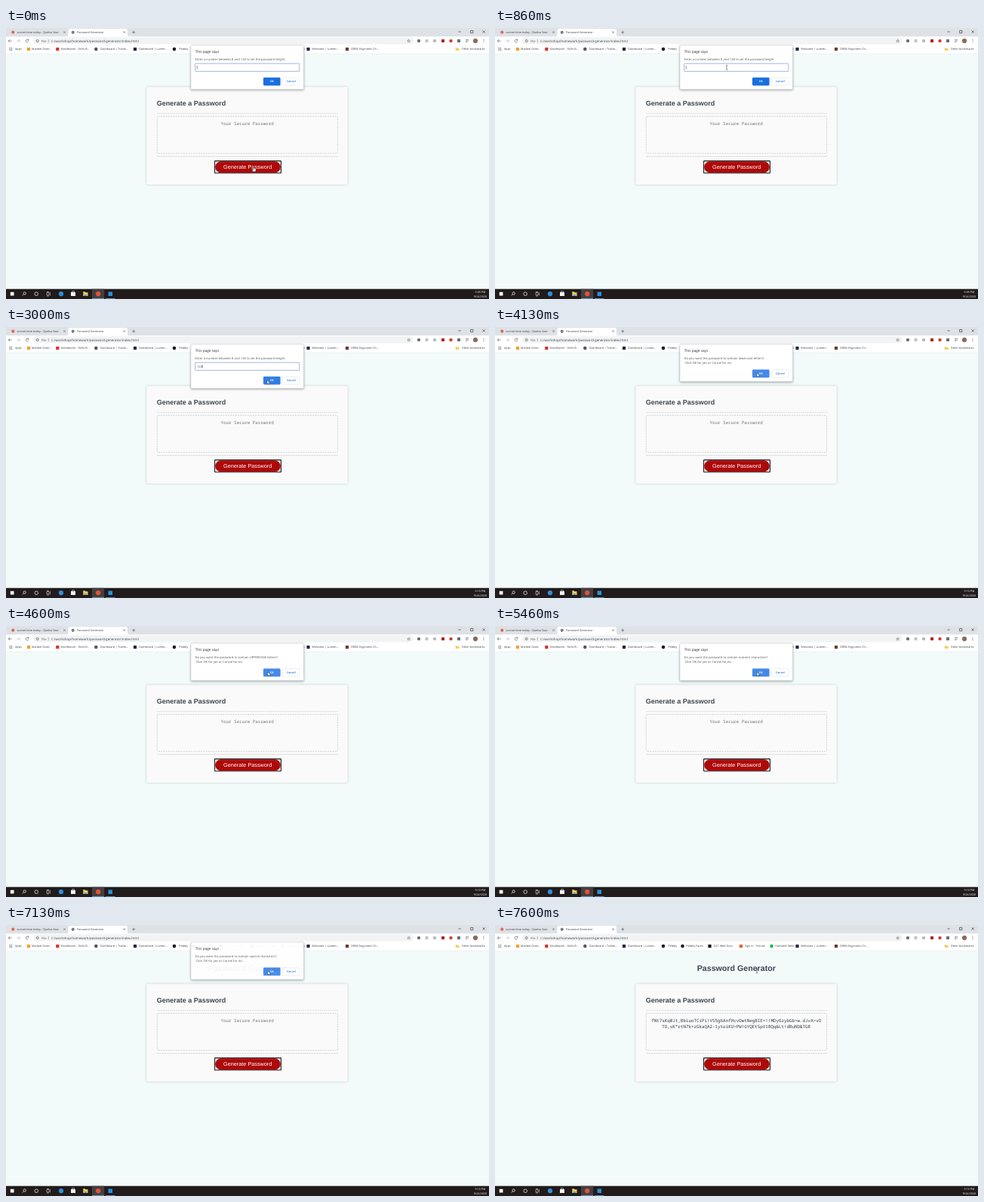
Animation of 640 by 360 pixels, one loop 8 s. Source, as an HTML page:

```html
<!DOCTYPE html>
<html lang="en">
<head>
<meta charset="utf-8">
<title>Password Generator</title>
<style>
html, body { margin: 0; width: 100%; height: 100%; overflow: hidden; background: #f2fafa; }
svg { display: block; width: 640px; height: 360px; }
text { font-family: "Open Sans", "Noto Sans", sans-serif; font-size: 3.76px; fill: #3c4043; text-rendering: geometricPrecision; white-space: pre; }
.page { font-family: "Liberation Sans", Arial, sans-serif; font-weight: bold; fill: #3b4650; }
.mono { font-family: "Noto Sans Mono", "DejaVu Sans Mono", monospace; font-size: 5.86px; text-anchor: middle; }
.says { font-size: 4.7px; fill: #202124; }
.msg { font-size: 4.1px; fill: #505357; }
.btn { font-size: 3.7px; font-weight: 600; text-anchor: middle; }
.clock { font-size: 3.7px; fill: #fff; text-anchor: middle; }
.url { font-size: 4.4px; }
.panel { filter: drop-shadow(0 1px 1.6px rgba(0, 0, 0, .35)); }
.card { filter: drop-shadow(.3px .3px 1.4px rgba(0, 0, 0, .2)); }

/* One shared 8 s timeline: 1% = 80 ms */
.dialog { animation: 8s infinite linear; }
#prompt { animation-name: prompt; }
#lower { animation-name: lower; }
#upper { animation-name: upper; }
#number { animation-name: number; }
#special { animation-name: special; }
@keyframes prompt {
  0%, 38.5% { opacity: 1; }
  39.25%, 100% { opacity: 0; }
}
@keyframes lower {
  0%, 40% { opacity: 0; transform: translateY(-13px); animation-timing-function: ease-out; }
  41.75%, 52.5% { opacity: 1; transform: none; }
  53.25%, 100% { opacity: 0; transform: none; }
}
@keyframes upper {
  0%, 53.75% { opacity: 0; transform: translateY(-13px); animation-timing-function: ease-out; }
  55.5%, 65.75% { opacity: 1; transform: none; }
  66.5%, 100% { opacity: 0; transform: none; }
}
@keyframes number {
  0%, 66.5% { opacity: 0; transform: translateY(-13px); animation-timing-function: ease-out; }
  68.25%, 76.6% { opacity: 1; transform: none; }
  77.25%, 100% { opacity: 0; transform: none; }
}
@keyframes special {
  0%, 77.25% { opacity: 0; transform: translateY(-13px); animation-timing-function: ease-out; }
  79%, 89.1% { opacity: 1; transform: none; }
  89.9%, 100% { opacity: 0; transform: none; }
}

#prompt .ok { animation: hoverPrompt 8s infinite step-end; }
#lower .ok { animation: hoverLower 8s infinite step-end; }
@keyframes hoverPrompt { 0% { fill: #1a6fe0; } 34.5%, 100% { fill: #317de6; } }
@keyframes hoverLower { 0% { fill: #1a6fe0; } 49.5%, 100% { fill: #4489e9; } }

.d1 { animation: d1 8s infinite step-end; }
.d2 { animation: d2 8s infinite step-end; }
.d3 { animation: d3 8s infinite step-end; }
@keyframes d1 { 0% { opacity: 0; } 13.1%, 100% { opacity: 1; } }
@keyframes d2 { 0% { opacity: 0; } 15.6%, 100% { opacity: 1; } }
@keyframes d3 { 0% { opacity: 0; } 18.1%, 100% { opacity: 1; } }
.caret { animation: caret 8s infinite step-end; }
@keyframes caret {
  0% { transform: none; }
  13.1% { transform: translateX(2.34px); }
  15.6% { transform: translateX(4.68px); }
  18.1%, 100% { transform: translateX(7.02px); }
}

.before { animation: before 8s infinite step-end; }
.after { animation: after 8s infinite step-end; }
@keyframes before { 0% { opacity: 1; } 90%, 100% { opacity: 0; } }
@keyframes after { 0% { opacity: 0; } 90%, 100% { opacity: 1; } }
.min9 { animation: min9 8s infinite step-end; }
.min10 { animation: min10 8s infinite step-end; }
@keyframes min9 { 0% { opacity: 1; } 11.6%, 100% { opacity: 0; } }
@keyframes min10 { 0% { opacity: 0; } 11.6%, 100% { opacity: 1; } }

#mouse { animation: mouse 8s infinite ease-in-out; }
@keyframes mouse {
  0%, .75% { transform: translate(328px, 183.5px); }
  10.5%, 27.5% { transform: translate(307px, 52.5px); }
  37%, 48.25% { transform: translate(346px, 70.5px); }
  51%, 100% { transform: translate(347px, 61px); }
}
.hand { animation: hand 8s infinite step-end; }
.arrow { animation: arrow 8s infinite step-end; }
.beam { animation: beam 8s infinite step-end; }
@keyframes hand { 0% { opacity: 1; } 2.4%, 100% { opacity: 0; } }
@keyframes arrow { 0% { opacity: 0; } 2.4% { opacity: 1; } 8.6% { opacity: 0; } 31% { opacity: 1; } 89.9%, 100% { opacity: 0; } }
@keyframes beam { 0% { opacity: 0; } 8.6% { opacity: 1; } 31% { opacity: 0; } 89.9%, 100% { opacity: 1; } }
</style>
</head>
<body>
<svg viewBox="0 0 640 360">
  <rect width="640" height="360" fill="#f2fafa"/>

  <!-- Page -->
  <text class="page" x="319.8" y="61" font-size="10.67" style="font-size:10.67px" text-anchor="middle">Password Generator</text>
  <rect class="card" x="186.3" y="78.3" width="266.4" height="129.8" rx="1.7" fill="#fafafa"/>
  <text class="page" x="199.7" y="103.1" style="font-size:9px">Generate a Password</text>
  <g fill="none" stroke="#c6c8ca" stroke-width=".6">
    <path d="M200 113.5H440" stroke-dasharray="2 .8"/>
    <rect x="200.3" y="117.4" width="239.2" height="49.2" rx="1.2" stroke="#b4b8bb" stroke-dasharray="2 1.3"/>
    <path d="M200 170.6H440" stroke-dasharray="3 .4"/>
  </g>
  <text class="mono before" x="319.7" y="128.9" style="fill:#757575">Your Secure Password</text>
  <g class="after">
    <text class="mono" x="319.7" y="128.9" style="fill:#2f3b44">fNt7sKq0Jt,BbiuoTCiPi!V55g6AnfHcvDwtNegBIE+!!MDy6zybGb&gt;w.dJvA&gt;vO</text>
    <text class="mono" x="319.7" y="136.5" style="fill:#2f3b44">TO,sK*rtN7k+zGkaQA2-1ytoiKU&gt;PW!GYQEtSpV1BQq&amp;Lt!dBuND&amp;TGR</text>
  </g>
  <rect x="276.6" y="176.6" width="87.8" height="16.2" rx=".5" fill="#fafafa" stroke="#161616" stroke-width="1.1"/>
  <rect x="277.2" y="177.2" width="86.6" height="15" rx="7.5" fill="#ad0909"/>
  <text class="page" x="320.2" y="187.1" text-anchor="middle" style="font-size:7.27px;font-weight:normal;fill:#fff">Generate Password</text>

  <!-- Tab strip -->
  <rect width="640" height="11.5" fill="#dee1e6"/>
  <path d="M80 11.5Q82.5 11.5 82.5 9V3.5Q82.5 1 85 1H158.500Q161 1 161 3.500V9Q161 11.5 163.500 11.5Z" fill="#fff"/>
  <circle cx="9.300" cy="5.700" r="2.1" fill="#e06a5a"/>
  <text x="14.5" y="7">sunset time today - Quelva Sear</text>
  <circle cx="88.7" cy="5.700" r="2" fill="#5f6368"/>
  <path d="M87.300 5.300h1.500l.7 1.200" stroke="#fff" stroke-width=".5" fill="none"/>
  <text x="94" y="7">Password Generator</text>
  <g fill="none" stroke="#4a4d51" stroke-width=".6">
    <path d="M76.300 4.400l2.400 2.400m0-2.400l-2.400 2.400M155.400 4.400l2.400 2.400m0-2.400l-2.400 2.400M167.200 5.700h4m-2-2v4"/>
    <path d="M599.500 5h3.300M615.600 3.400h3.200v3.200h-3.200zM631.600 3.400l3.200 3.200m0-3.200l-3.200 3.200" stroke="#222"/>
  </g>

  <!-- Toolbar -->
  <rect y="11.5" width="640" height="22.700" fill="#fff"/>
  <rect x="36" y="12.600" width="504" height="9" rx="4.500" fill="#f1f3f4"/>
  <g fill="none" stroke="#5f6368" stroke-width=".7">
    <path d="M7.600 17.100H3.300m1.900-2l-2 2 2 2"/>
    <path d="M14.300 17.100h4.300m-1.900-2l2 2-2 2" stroke="#b6b9bd"/>
    <path d="M29.700 16a1.900 1.900 0 1 0 .1 2M30 14.700v1.600h-1.600"/>
    <circle cx="41.700" cy="17.100" r="1.600"/>
    <path d="M41.700 16.900v1.100M56.300 15v4.300" stroke-width=".45"/>
    <path d="M533.700 15.200l.6 1.300 1.400.1-1.100.9.4 1.400-1.300-.8-1.200.8.300-1.400-1.100-.9 1.500-.1z" stroke-width=".5"/>
    <path d="M609 15.600h4M609 17.100h4M609 18.600h2.400" stroke-width=".6"/>
  </g>
  <text class="url" x="47" y="18.700" style="fill:#5f6368;font-size:4.200px">File</text>
  <text class="url" x="60" y="18.700">C:/workshop/homework/password-generator/index.html</text>
  <g id="tools"></g>
  <circle cx="622" cy="17.100" r="3.100" fill="#8d6a58"/>
  <g fill="#5f6368"><circle cx="633" cy="15.500" r=".5"/><circle cx="633" cy="17.100" r=".5"/><circle cx="633" cy="18.700" r=".5"/></g>
  <path d="M0 34.300H640" stroke="#e3e7e9" stroke-width=".5"/>

  <!-- Bookmarks -->
  <g id="marks"></g>
  <path d="M595.700 26.200h2l.6.700h2.300v3.200h-4.900z" fill="#f3cf63"/>
  <text x="603.800" y="29.400">Other bookmarks</text>

  <g id="dialogs"></g>

  <!-- Taskbar -->
  <rect y="346.700" width="640" height="13.300" fill="#211b1b"/>
  <rect x="114" y="346.700" width="16.200" height="13.300" fill="#453f3f"/>
  <path d="M114.200 359.600h15.800M131.800 359.600h12.800" stroke="#76b9ed" stroke-width=".8"/>
  <rect x="5.800" y="350.800" width="4.700" height="4.700" fill="#fff"/>
  <g fill="none" stroke="#fff" stroke-width=".7">
    <circle cx="24.700" cy="352.500" r="1.700"/>
    <path d="M23.500 353.700l-1.700 1.800"/>
    <circle cx="40.200" cy="353.200" r="2.300"/>
    <path d="M54 351.600h3v3.300h-3zM58.500 351v4.500M54 350.500h3M54 356h3" stroke-width=".5"/>
  </g>
  <circle cx="73" cy="353.200" r="3.100" fill="#2f8fd8"/>
  <rect x="86" y="351" width="6" height="5" fill="#f4f4f4"/>
  <path d="M87.600 351v-1.300h2.800v1.300" fill="none" stroke="#f4f4f4" stroke-width=".6"/>
  <path d="M102.300 350.300h2.300l.7.900h3.200v4.700h-6.200z" fill="#f5cd5c"/>
  <path d="M103.700 354h3.500v1.900h-3.500z" fill="#4aa3dd"/>
  <circle cx="122.200" cy="353.200" r="3.100" fill="#e0533f"/>
  <rect x="135.500" y="350.500" width="5.500" height="5.500" fill="#2a8fd6"/>
  <text class="clock min9" x="628.500" y="351.800">9:09 PM</text>
  <text class="clock min10" x="628.500" y="351.800">9:10 PM</text>
  <text class="clock" x="628.500" y="357.600">9/24/2020</text>

  <!-- Pointer, origin at its hotspot -->
  <g id="mouse">
    <path class="hand" d="M-.6 .4Q0-.4 .6 .4V3L3 3.700Q3.500 4 3.300 5L2.600 7.300H-.6L-2.500 4.600Q-2.300 3.700-1.400 4.300L-.6 5Z" fill="#fff" stroke="#111" stroke-width=".5"/>
    <path class="arrow" d="M0 0V5.300L1.300 4.200 2.100 6 2.900 5.600 2.100 3.900H3.800Z" fill="#fff" stroke="#222" stroke-width=".4"/>
    <path class="beam" d="M-1.200-2.800H1.200M0-2.800V2.800M-1.200 2.800H1.200" fill="none" stroke="#333" stroke-width=".55"/>
  </g>
</svg>
<script>
const fill = (id, html) => { document.getElementById(id).innerHTML = html; };
const dot = (x, y, r, color) => `<circle cx="${x}" cy="${y}" r="${r}" fill="${color}"/>`;
const box = (x, y, size, color) =>
  `<rect x="${x - size / 2}" y="${y - size / 2}" width="${size}" height="${size}" fill="${color}"/>`;

// Toolbar extensions
fill('tools', [
  [547, '#6a6e73'], [557.5, '#c0c3c7'], [568, '#b4b7bb'],
  [579, '#b3241f'], [589.5, '#d23a30'], [600, '#6a6e73']
].map(([x, color], i) => i % 2 ? box(x, 17.1, 4, color) : dot(x, 17.1, 2.2, color)).join(''));

// Bookmarks: icon x, text x, colour, label, round icon
const marks = [
  [30, 34, '#f0a030', 'Maribel Gives'],
  [68.3, 72.8, '#d8322f', 'Kindlework - Skills-B...'],
  [119.3, 124.8, '#55595e', 'Dashboard | Trailsk...', 1],
  [171, 176, '#1f2a44', 'Dashboard | Lumet...'],
  [223, 229.3, '#1b1f23', 'Pebbly', 1],
  [248.5, 253.3, '#1b1f23', 'Pebbly Faces', 1],
  [284.5, 289.8, '#111', 'QLT Web Docs'],
  [326, 331, '#e2632c', 'Sign in · Forrow'],
  [366.5, 371, '#1fb857', 'Humdrift Web', 1],
  [400.5, 405.3, '#1f2a44', 'Welcome | Lumetr...'],
  [452, 457, '#6b3b33', 'ORBA Engineers Ch...']
];
let grid = '';
for (let i = 0; i < 9; i++)
  grid += box(4.8 + i % 3 * 1.5, 26.6 + Math.floor(i / 3) * 1.5, 1, ['#e0533f', '#4a86e8', '#3aa757'][i % 3]);
fill('marks', grid + '<text x="12" y="29.4">Apps</text>' + marks.map(([x, tx, color, label, round]) =>
  (round ? dot(x, 28.1, 2.3, color) : box(x, 28.1, 4.2, color)) +
  `<text x="${tx}" y="29.4">${label}</text>`).join(''));

// Browser dialogs
const dialog = (id, height, body, okColor) => {
  const y = 23 + height - 15.8;
  return `<g id="${id}" class="dialog">
    <rect class="panel" x="245" y="23" width="149.5" height="${height}" rx="1.2" fill="#fff" stroke="#b9bcc0" stroke-width=".4"/>
    <text class="says" x="250.7" y="32.8">This page says</text>${body}
    <rect class="ok" x="341" y="${y}" width="22.6" height="10.6" rx="1.3" fill="${okColor}"/>
    <text class="btn" x="352.3" y="${y + 6.6}" style="fill:#fff">OK</text>
    <rect x="366.6" y="${y + .2}" width="22.4" height="10.2" rx="1.3" fill="#fff" stroke="#dadce0" stroke-width=".5"/>
    <text class="btn" x="377.8" y="${y + 6.6}" style="fill:#1a6fe0">Cancel</text>
  </g>`;
};
const line = (y, text) => `<text class="msg" x="250.5" y="${y}">${text}</text>`;
const confirmBox = (id, kind) => dialog(id, 49.4,
  line(42.6, `Do you want the password to contain ${kind}?`) +
  line(49.2, ' Click OK for yes or Cancel for no.'), '#4489e9');

const field = line(42.6, 'Enter a number between 8 and 128 to set the password length.') +
  `<rect x="250.6" y="47.2" width="138.2" height="10.4" rx=".8" fill="#fff" stroke="#7d9bd8" stroke-width=".7"/>` +
  [1, 2, 0].map((n, i) => `<text class="msg d${i + 1}" x="${253 + i * 2.34}" y="53.8">${n}</text>`).join('') +
  `<path class="caret" d="M253.2 50v4.8" stroke="#222" stroke-width=".5"/>`;

fill('dialogs', dialog('prompt', 58.6, field, '#1a6fe0') +
  confirmBox('lower', 'lowercase letters') +
  confirmBox('upper', 'UPPERCASE letters') +
  confirmBox('number', 'numeric characters') +
  confirmBox('special', 'special characters'));
</script>
</body>
</html>
```
